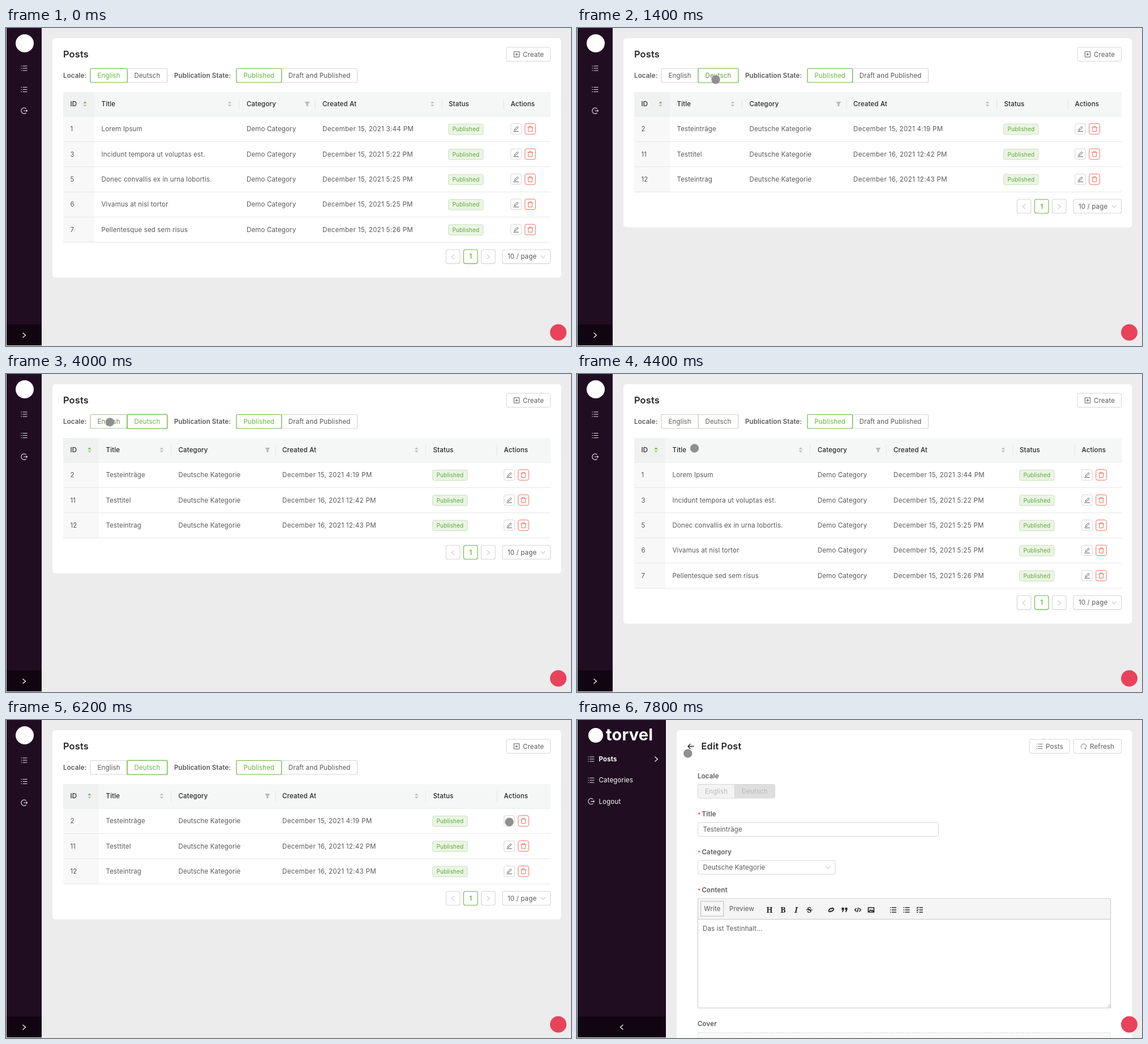
Animation, 998 px wide and 561 px high, one loop 8000 ms. Source, as an HTML page:

```html
<!DOCTYPE html>
<html lang="en">
<head>
<meta charset="utf-8">
<title>Posts admin</title>
<style>
  html, body { margin: 0; width: 100%; height: 100%; overflow: hidden; background: #ececec; }
  svg { display: block; width: 100%; height: 100%; font-family: Inter, Roboto, sans-serif; letter-spacing: .15px; }
  text { white-space: pre; }
</style>
</head>
<body>
<svg id="stage" viewBox="0 0 998 561"></svg>
<script>
const LOOP = 8000, STEP = 200;
const GREEN = '#67b83e', INK = '#595959', DARK = '#262626', LINE = '#d5d5d5', RED = '#ee705c';

const mix = (k, a, b) => `rgb(${a.map((v, i) => Math.round(v + (b[i] - v) * k))})`;
const textTone = k => mix(k, [89, 89, 89], [103, 184, 62]);
const lineTone = k => mix(k, [213, 213, 213], [103, 184, 62]);

// Drawing helpers; text is placed by its vertical centre.
const text = (x, y, s, { size = 11.5, weight = 400, fill = INK, anchor = 'start', extra = '' } = {}) =>
  `<text x="${x}" y="${y + size * .36}" font-size="${size}" font-weight="${weight}" fill="${fill}" text-anchor="${anchor}" ${extra}>${s}</text>`;
const rect = (x, y, w, h, fill, stroke = 'none', r = 0, extra = '') =>
  `<rect x="${x}" y="${y}" width="${w}" height="${h}" rx="${r}" fill="${fill}" stroke="${stroke}" ${extra}/>`;
const path = (d, x, y, stroke = INK, width = 1, fill = 'none') =>
  `<path d="${d}" transform="translate(${x} ${y})" fill="${fill}" stroke="${stroke}" stroke-width="${width}" stroke-linejoin="round"/>`;
const label = (x, y, s) => text(x, y, s, { weight: 600 });
const title = (x, s) => text(x, 46.3, s, { size: 16.4, weight: 600, fill: DARK });
const centred = (x, y, s, fill = INK) => text(x, y, s, { fill, anchor: 'middle' });

const ICON = {
  list: 'M-2.5-4H5.5M-2.5 0H5.5M-2.5 4H5.5M-5.5-4H-4M-5.5 0H-4M-5.5 4H-4',
  exit: 'M3.6-3.8A5.2 5.2 0 1 0 3.6 3.8M-1 0H5.5M3.8-1.7L5.5 0 3.8 1.7',
  right: 'M-2.5-4.2L2.5 0-2.5 4.2',
  left: 'M2.5-4.2L-2.5 0 2.5 4.2',
  down: 'M-3.7-2L0 2.4 3.7-2',
  back: 'M5.5 0H-5M-.5-4.5L-5 0-.5 4.5',
  pen: 'M-3 2.6L-2.5 .6 2.3-4.2 4-2.5-.8 2.2ZM-4.8 4.6H4.8',
  trash: 'M-4.7-2.8H4.7M-2-2.8V-4.6H2V-2.8M-3.7-2.8L-3.2 4.7H3.2L3.7-2.8',
  plus: 'M-4.7-4.7H4.7V4.7H-4.7ZM-2.4 0H2.4M0-2.4V2.4',
  refresh: 'M-2.4 4.2A4.6 4.6 0 1 1 2.4 4.2M2.2 2V4.4H4.6',
  funnel: 'M-4.5-4H4.5L1.5 0V4H-1.5V0Z',
  link: 'M-.9 2.3L-2 3.4A2.2 2.2 0 0 1-4.2 .4L-1.8-2A2.2 2.2 0 0 1 1.5-1.5M.9-2.3L2-3.4A2.2 2.2 0 0 1 4.2-.4L1.8 2A2.2 2.2 0 0 1-1.5 1.5',
  quote: 'M-5-4H-1V0L-3 4H-4.5L-3.2 0H-5ZM1-4H5V0L3 4H1.5L2.8 0H1Z',
  code: 'M-2.5-3L-5.3 0-2.5 3M2.5-3L5.3 0 2.5 3M1-4L-1 4',
  image: 'M-5-4H5V4H-5ZM-4 3L-1 0 1 1.8 2.4 .5 4 3',
  check: 'M-1-4H5.5M-1 0H5.5M-1 4H5.5M-5.5-4L-4.4-3-2.6-5M-5.5 0L-4.4 1-2.6-1M-5.5 4H-3',
};
const icon = (name, x, y, stroke, width) => path(ICON[name], x, y, stroke, width);

const sorter = (x, active) =>
  path('M-3.2-1.2L0-4.6 3.2-1.2Z', x, 134, 'none', 0, active ? GREEN : '#b8b8b8') +
  path('M-3.2 1.2L0 4.6 3.2 1.2Z', x, 134, 'none', 0, '#b8b8b8');

// Two joined buttons; levels run from 0 (plain) to 1 (selected).
function toggle(x, split, end, names, levels, glow) {
  const parts = [[x, split], [split, end]].map(([a, b], i) => ({ a, b, i, k: levels[i] }));
  return parts.sort((p, q) => p.k - q.k).map(({ a, b, i, k }) =>
    (glow && k > .5 ? rect(a, 71.5, b - a, 24.5, 'none', GREEN, 2, 'stroke-width="4" opacity=".2"') : '') +
    rect(a, 71.5, b - a, 24.5, '#fff', lineTone(k), 2, 'stroke-width="1.2"') +
    centred((a + b) / 2, 84, names[i], textTone(k))).join('');
}

function sidebar(open) {
  const width = open ? 156 : 62;
  let out = rect(1, 0, width, 560, '#200d22') + rect(1, 523, width, 37, '#110512') +
    icon(open ? 'left' : 'right', 1 + width / 2, 542, '#fff', 1.2);
  if (!open) {
    return out + '<circle cx="33" cy="27" r="16" fill="#fff"/>' +
      ['list', 'list', 'exit'].map((name, i) => icon(name, 32, 71 + i * 37.5, '#e8e3e8', 1.2)).join('');
  }
  out += '<circle cx="33" cy="27" r="13" fill="#fff"/>' +
    text(51, 26, 'torvel', { size: 29, weight: 700, fill: '#fff' }) + icon('right', 140, 69, '#fff', 1.2);
  return out + [['list', 'Posts', 700], ['list', 'Categories', 400], ['exit', 'Logout', 400]].map(([name, s, weight], i) =>
    icon(name, 25, 69 + i * 37.3, '#e8e3e8', 1.1) + text(38.5, 69 + i * 37.3, s, { weight, fill: '#fff' })).join('');
}

const TABLES = {
  en: {
    idEnd: 156, cols: [168.5, 425, 559, 782, 891.5], sorters: [139.5, 395, 753], funnel: 532,
    dividers: [411.5, 546, 770, 879], tag: 781.5, pen: 901, category: 'Demo Category',
    rows: [
      [1, 'Lorem Ipsum', '15, 2021 3:44'], [3, 'Incidunt tempora ut voluptas est.', '15, 2021 5:22'],
      [5, 'Donec convallis ex in urna lobortis.', '15, 2021 5:25'], [6, 'Vivamus at nisl tortor', '15, 2021 5:25'],
      [7, 'Pellentesque sed sem risus', '15, 2021 5:26'],
    ],
  },
  de: {
    idEnd: 164, cols: [176.5, 304.5, 488, 754.5, 879.5], sorters: [147.5, 275, 725], funnel: 462,
    dividers: [291.5, 476, 741.5, 867], tag: 753.5, pen: 889, category: 'Deutsche Kategorie',
    rows: [[2, 'Testeinträge', '15, 2021 4:19'], [11, 'Testtitel', '16, 2021 12:42'], [12, 'Testeintrag', '16, 2021 12:43']],
  },
};

function table({ idEnd, cols, sorters, funnel, dividers, tag, pen, category, rows }) {
  const heading = (x, s) => text(x, 134, s, { weight: 500, fill: DARK });
  let out = rect(101, 113, 861, 43, '#f5f6f6') + rect(101, 113, idEnd - 101, 43, '#f0f1f1') +
    rect(101, 156, idEnd - 101, rows.length * 44.4, '#f8f8f8') + rect(101, 155.5, 861, 1, '#ececec') +
    heading(113.5, 'ID') + ['Title', 'Category', 'Created At', 'Status', 'Actions'].map((s, i) => heading(cols[i], s)).join('') +
    sorters.map((x, i) => sorter(x, i === 0)).join('') + path(ICON.funnel, funnel, 134, 'none', 0, '#b8b8b8') +
    dividers.map(x => rect(x - .5, 125, 1, 19, '#e5e5e5')).join('');
  rows.forEach(([id, name, date], i) => {
    const y = 178 + i * 44.4;
    out += text(113.5, y, id) + text(cols[0], y, name) + text(cols[1], y, category) +
      text(cols[2], y, `December ${date} PM`, { extra: 'letter-spacing=".33"' }) +
      rect(tag, y - 8.7, 61.5, 18.5, '#ebf4e5', '#c9e3b9', 3) +
      text(tag + 30.8, y + .5, 'Published', { size: 10, fill: '#5da936', anchor: 'middle' }) +
      rect(pen - 9.3, y - 9.3, 18.6, 18.6, '#fff', LINE, 3) + icon('pen', pen, y, INK) +
      rect(pen + 15.7, y - 9.3, 18.6, 18.6, '#fff', RED, 3) + icon('trash', pen + 25, y, RED) +
      rect(101, y + 21.9, 861, 1, '#e6e6e6');
  });
  return out;
}

function pagination(y) {
  const cell = (x, w, stroke) => rect(x, y - 12.3, w, 24.6, '#fff', stroke, 3, 'stroke-width="1.1"');
  return cell(777.3, 24.6, LINE) + cell(808.4, 24.6, GREEN) + cell(839.5, 24.6, LINE) + cell(877, 84.6, LINE) +
    icon('left', 789.5, y + .5, '#b5b5b5') + icon('right', 851.8, y + .5, '#b5b5b5') +
    text(820.7, y, '1', { weight: 600, fill: GREEN, anchor: 'middle' }) +
    text(886, y, '10 / page') + icon('down', 948.5, y, '#b5b5b5');
}

// [start, English level, Deutsch level]
const LOCALE_LEVELS = [
  [0, 1, 0], [1200, 1, .4], [1400, 0, .7], [1600, 0, 1], [3600, .5, 1], [4400, .12, .12],
  [4600, 1, 0], [5000, 1, .5], [5200, .85, 0], [5400, 0, 1],
];

function listPage(t) {
  const german = (t >= 1400 && t < 4400) || t >= 5200;
  const data = german ? TABLES.de : TABLES.en;
  const bottom = 156 + data.rows.length * 44.4;
  const [, ...levels] = LOCALE_LEVELS.findLast(([start]) => t >= start);
  return sidebar(false) + rect(82, 18, 898.5, bottom + 44.5, '#fff', 'none', 5) +
    title(101, 'Posts') +
    rect(884, 34, 77.5, 24.7, '#fff', LINE, 3) + icon('plus', 902, 46.5) + text(913, 46.5, 'Create') +
    label(101, 84, 'Locale:') + toggle(149, 214.3, 284.8, ['English', 'Deutsch'], levels, german) +
    label(297, 84, 'Publication State:') + toggle(407, 486.7, 620.5, ['Published', 'Draft and Published'], [1, 0]) +
    table(data) + pagination(bottom + 25.3);
}

function editor() {
  const glyph = (x, s, extra = '') =>
    text(x, 335, s, { size: 13.5, weight: 700, fill: DARK, anchor: 'middle', extra: `font-family="Noto Serif, serif" ${extra}` });
  return rect(213.5, 315, 729, 193, '#fff', '#c6c6c6') + rect(214, 315.5, 728, 35.5, '#f5f5f5') +
    rect(213.5, 351, 729, 1, '#c8c8c8') + rect(218.7, 320, 40, 26, '#f7f7f7', '#b9b9b9') +
    centred(239, 333, 'Write') + centred(291, 333, 'Preview') +
    glyph(340, 'H') + glyph(364, 'B') + glyph(387, 'I', 'font-style="italic"') + glyph(410.5, 'S') +
    rect(405, 334.3, 11, 1.2, DARK) +
    icon('link', 449, 335, DARK, 1.9) + path(ICON.quote, 472.5, 335, 'none', 0, DARK) +
    icon('code', 496, 335, DARK, 1.6) + icon('image', 519.5, 335, DARK, 1.7) +
    icon('list', 558.5, 335, DARK, 1.7) + icon('list', 582, 335, DARK, 1.7) + icon('check', 605.5, 335, DARK, 1.6) +
    path('M-5 0L0-5M-2 0L0-2', 942, 507, '#999', .8);
}

function editPage(t) {
  const loaded = t >= 6800;
  const required = (y, s) => text(213, y + 1.5, '*', { size: 10, fill: '#ff4d4f', weight: 600 }) + label(220.5, y, s);
  const faint = '#b9b9b9';
  return sidebar(true) + rect(176, 18, 804.5, 550, '#fff', 'none', 5) +
    icon('back', 201, 46.5, DARK, 1.3) + title(219.5, 'Edit Post') +
    rect(799, 34, 71, 24.7, '#fff', LINE, 3) + icon('list', 817, 46.5, '#777') + text(828, 46.5, 'Posts') +
    rect(877, 34, 84.7, 24.7, '#fff', LINE, 3) + icon('refresh', 895, 46.5, '#777') + text(906, 46.5, 'Refresh') +
    label(213, 98.5, 'Locale') + rect(213.5, 113.5, 136, 24.5, '#f3f3f3', LINE, 3) +
    (loaded ? rect(278.5, 114, 70.5, 23.5, '#dedede', 'none', 2) : '') + rect(278, 114, 1, 24, LINE) +
    centred(246, 126, 'English', faint) + centred(314, 126, 'Deutsch', faint) +
    required(165.5, 'Title') + rect(213.5, 180.7, 425, 24.5, '#fff', LINE, 3) +
    required(232.5, 'Category') + rect(213.5, 247.7, 242.5, 24.5, '#fff', LINE, 3) + icon('down', 443, 260, '#b5b5b5') +
    required(299.5, 'Content') + editor() +
    (loaded ? text(222.5, 193, 'Testeinträge') + text(222.5, 260, 'Deutsche Kategorie') + text(222, 368, 'Das ist Testinhalt...') : '') +
    label(213, 535.5, 'Cover') + rect(213.5, 551.5, 729, 20, '#f8f8f8', '#d0d0d0', 2, 'stroke-dasharray="2 2"');
}

// Pointer stops: [time, x, y]
const POINTER = [
  [400, 470, 420], [1200, 246, 93], [1400, 245, 91], [1800, 236, 150], [2400, 215, 262], [3000, 195.5, 229],
  [3600, 182, 82], [4200, 184, 86], [4400, 207.5, 131], [4600, 232, 112], [5000, 262, 88], [5200, 282.3, 102],
  [6000, 886, 182], [6200, 889, 180], [6400, 886.6, 191.5], [7200, 886.6, 191.5], [7800, 195.8, 59],
];

function pointer(t) {
  const next = POINTER.findIndex(([time]) => time >= t);
  if (t < POINTER[0][0]) return '';
  const [t1, x1, y1] = POINTER[next], [t0, x0, y0] = POINTER[Math.max(0, next - 1)];
  const p = t1 > t0 ? (t - t0) / (t1 - t0) : 1, k = p * p * (3 - 2 * p);
  return `<circle cx="${x0 + (x1 - x0) * k}" cy="${y0 + (y1 - y0) * k}" r="7.3" fill="#8a8a8a" fill-opacity=".95" stroke="#808080" stroke-width=".6"/>`;
}

const stage = document.getElementById('stage');
let shown = -1;

function draw() {
  const t = Math.floor(performance.now() % LOOP / STEP) * STEP;
  if (t !== shown) {
    shown = t;
    stage.innerHTML = rect(0, 0, 998, 561, '#ececec') + (t < 6400 ? listPage(t) : editPage(t)) +
      '<circle cx="975.5" cy="537" r="14.5" fill="#e8435a"/>' + pointer(t);
  }
  requestAnimationFrame(draw);
}
draw();
</script>
</body>
</html>
```
